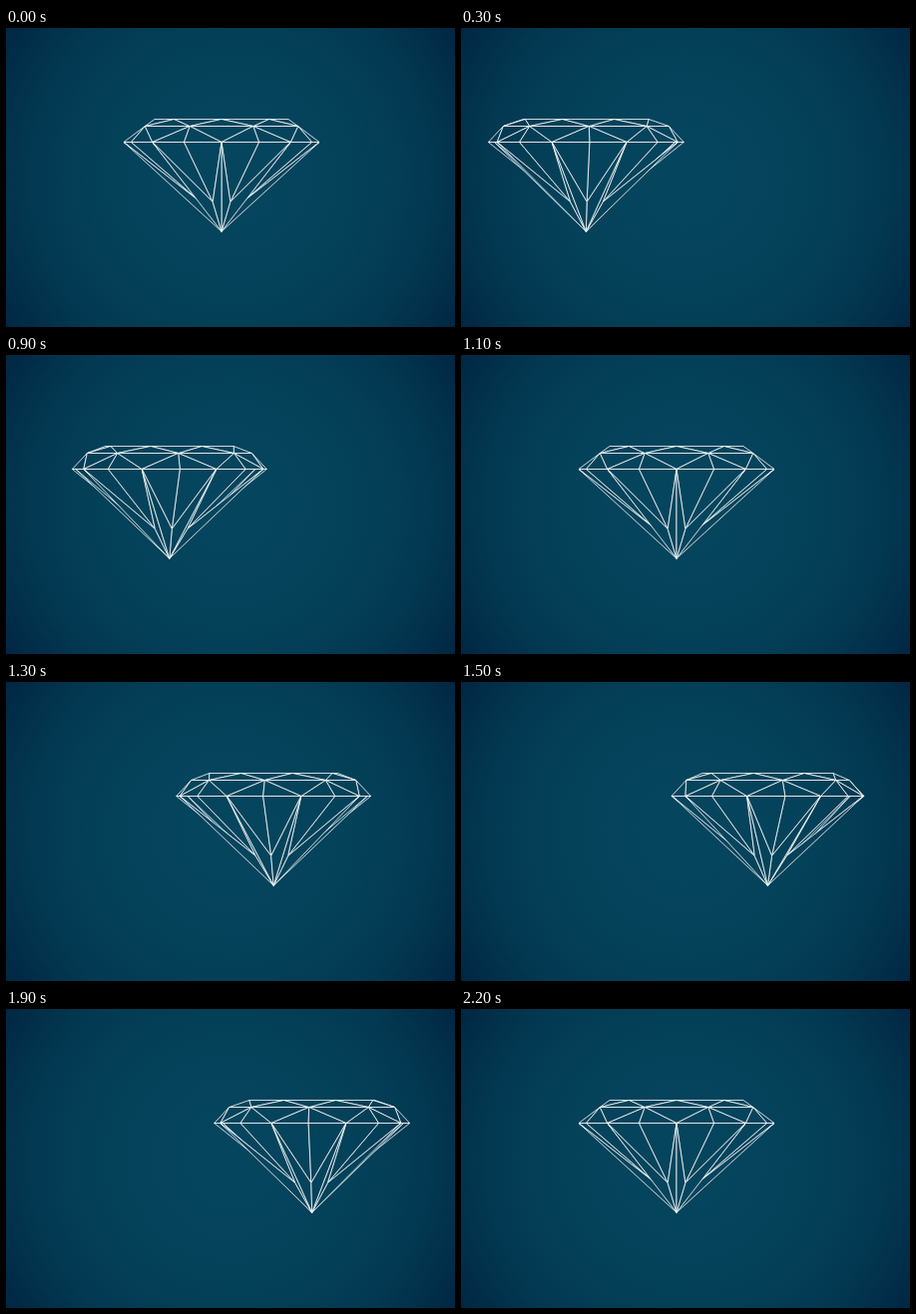
An HTML page with a canvas for the animation above (2.25 s loop, 450 px wide and 300 px high).

```html
<!DOCTYPE html>
<html lang="en">
<head>
<meta charset="utf-8">
<title>Rolling diamond</title>
<style>
html, body { margin: 0; width: 100%; height: 100%; overflow: hidden; background: #043f58; }
canvas { display: block; }
</style>
</head>
<body>
<canvas id="stage" width="450" height="300"></canvas>
<script>
const ctx = document.getElementById('stage').getContext('2d');
const STEP = 50, STEPS = 45, HALF = 22;
const CENTER = 216, SWING = 108.3, PEAK = 9.5;

const backdrop = ctx.createRadialGradient(225, 150, 0, 225, 150, 272);
backdrop.addColorStop(0, '#05465e');
backdrop.addColorStop(0.45, '#04425a');
backdrop.addColorStop(0.75, '#033851');
backdrop.addColorStop(1, '#012642');

// Rings of the cut stone: radius, height, vertex count, angular offset in degrees
const rings = {
  T: [67, 91.5, 8, 0],
  M: [83, 98.5, 8, 22.5],
  G: [98, 114.5, 16, 0],
  L: [23, 174.5, 8, 22.5],
  A: [0, 204.2, 1, 0]
};

// Facets wind clockwise when seen from outside
const body = [], keel = [];
for (let k = 0; k < 8; k++) {
  const g = 2 * k, p = k + 7, n = k + 1;
  body.push(
    [['T', k], ['T', n], ['M', k]],
    [['T', k], ['M', k], ['M', p]],
    [['M', p], ['M', k], ['G', g]],
    [['M', k], ['G', g + 1], ['G', g]],
    [['M', k], ['G', g + 2], ['G', g + 1]],
    [['G', g], ['G', g + 1], ['L', k]],
    [['G', g + 1], ['G', g + 2], ['L', k]]
  );
  keel.push(
    [['G', g], ['L', k], ['A', 0]],
    [['G', g], ['A', 0], ['L', p]]
  );
}

function vertex([ring, index], x, turn) {
  const [r, y, count, offset] = rings[ring];
  const a = (index * 360 / count + offset + turn) * Math.PI / 180;
  return { x: x + r * Math.sin(a), y, z: r * Math.cos(a) };
}

const area = ([a, b, c]) =>
  (b.x - a.x) * (c.y - a.y) - (b.y - a.y) * (c.x - a.x);
const depth = face => face.reduce((sum, v) => sum + v.z, 0);

function drawFace(face) {
  ctx.beginPath();
  for (const v of face) ctx.lineTo(v.x, v.y);
  ctx.closePath();
  ctx.fill();
  ctx.stroke();
}

// Quick swing out, slower swing back; the second half mirrors the first
function swing(i) {
  if (i > HALF) return -swing(2 * HALF - i);
  const u = i < PEAK ? i / PEAK : (HALF - i) / (HALF - PEAK);
  return -SWING * Math.sin(u * Math.PI / 2);
}

function draw(i) {
  ctx.fillStyle = backdrop;
  ctx.fillRect(0, 0, 450, 300);
  ctx.strokeStyle = '#fff';
  ctx.lineWidth = 0.8;
  ctx.lineJoin = 'round';
  const x = CENTER + swing(i), turn = i * 90 / HALF;
  for (const group of [body, keel]) {
    group
      .map(face => face.map(v => vertex(v, x, turn)))
      .filter(face => area(face) > 0.01)
      .sort((a, b) => depth(a) - depth(b))
      .forEach(drawFace);
  }
}

const start = performance.now();
function tick() {
  draw(Math.floor((performance.now() - start) / STEP) % STEPS);
  requestAnimationFrame(tick);
}
tick();
</script>
</body>
</html>
```
